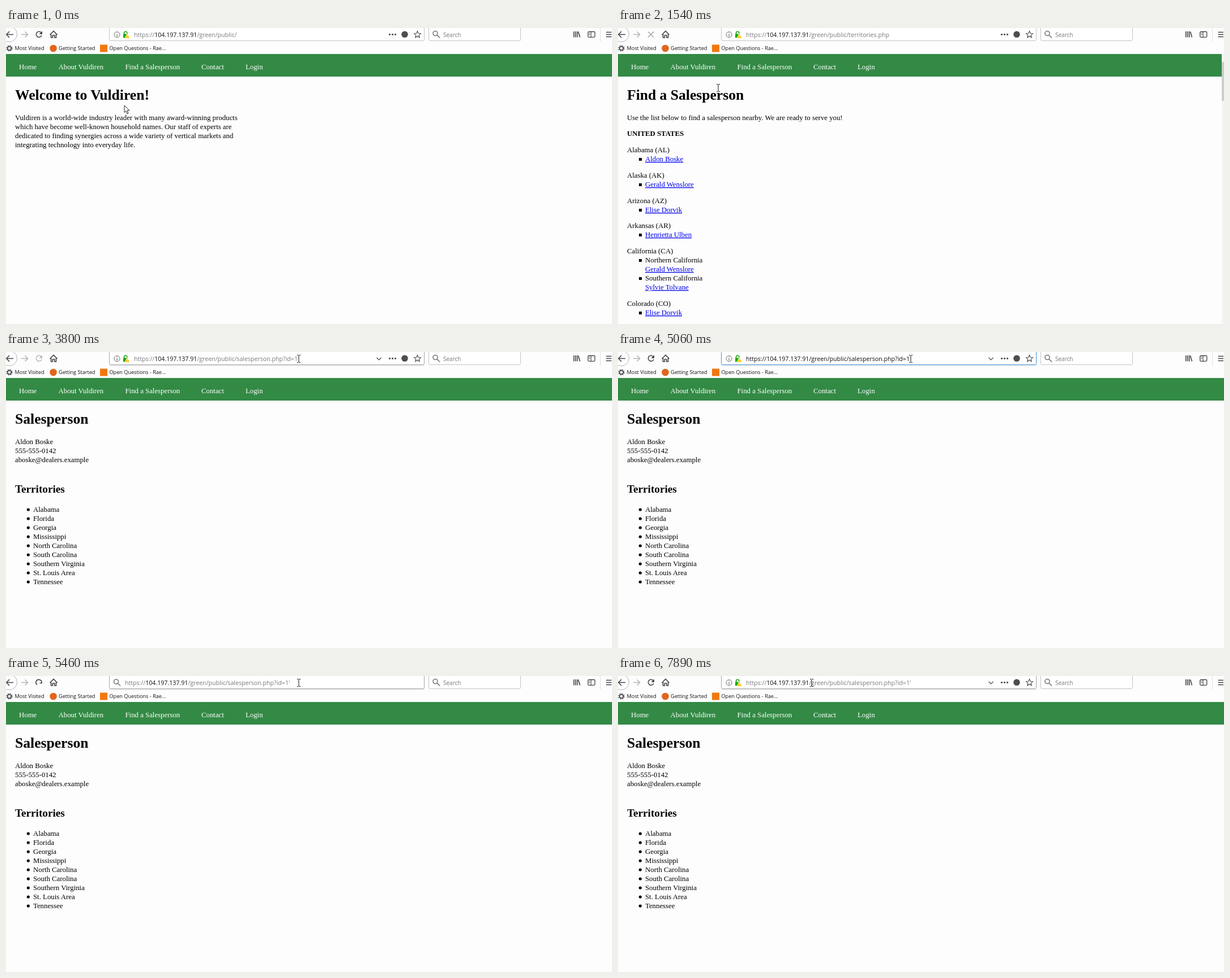
An HTML page for the animation above (8000 ms loop, 1070 px wide and 524 px high).

```html
<!DOCTYPE html>
<html lang="en">
<head>
<meta charset="utf-8">
<title>Browsing a sales site</title>
<style>
  html, body { margin: 0; width: 100%; height: 100%; overflow: hidden; background: #fdfdfd; }
  svg { display: block; width: 1070px; height: 524px; }
  .page { font: 12.8px "Liberation Serif", "Times New Roman", serif; }
  .ui { font: 9.15px "Open Sans", "Noto Sans", sans-serif; }
  .address { font-size: 10.62px; }
  h1, .h1 { font-size: 25.6px; font-weight: bold; }
  .h2 { font-size: 19.2px; font-weight: bold; }
  .line { fill: none; stroke: #45454a; stroke-width: 1.6; }
  .link { fill: #00e; text-decoration: underline; }
</style>
</head>
<body>
<svg viewBox="0 0 1070 524" xmlns="http://www.w3.org/2000/svg">
  <rect width="1070" height="524" fill="#fdfdfd"/>

  <g class="page">
    <rect id="nav" y="46" height="40" fill="#338a45"/>
    <g fill="#fff">
      <text x="23" y="73">Home</text>
      <text x="92.5" y="73">About Vuldiren</text>
      <text x="210.5" y="73">Find a Salesperson</text>
      <text x="345" y="73">Contact</text>
      <text x="423" y="73">Login</text>
    </g>
    <g data-when="home" id="home"><text class="h1" x="16" y="127">Welcome to Vuldiren!</text></g>
    <g data-when="list" id="list">
      <text class="h1" x="16" y="127">Find a Salesperson</text>
      <text x="16" y="163">Use the list below to find a salesperson nearby. We are ready to serve you!</text>
      <text x="16" y="191" font-weight="bold">UNITED STATES</text>
      <rect x="1066" y="46" width="4" height="478" fill="#f4f4f4"/>
      <rect x="1066" y="60" width="4" height="69" fill="#cdcdcd"/>
    </g>
    <g data-when="person" id="person">
      <text class="h1" x="16" y="127">Salesperson</text>
      <text class="h2" x="16" y="249">Territories</text>
    </g>
  </g>

  <g class="ui" id="toolbar">
    <!-- back, forward, reload, home -->
    <circle cx="6" cy="11" r="13.5" fill="#fff" stroke="#b4b4b6"/>
    <path class="line" d="M13 11.5H1M6 6L.8 11.5L6 17"/>
    <path class="line" style="stroke:#b6b6b8" d="M27 11.5H38.5M33.5 6.5L38.5 11.5L33.5 16.5"/>
    <g data-when="reload off">
      <path id="reloadArc" class="line" d="M62.3 8.2A5 5 0 1 0 63 13"/>
      <path id="reloadTip" d="M64 5.5V11H58.5Z" fill="#45454a"/>
    </g>
    <path data-when="spin" class="line" d="M55 15.5A5 5 0 1 1 62.8 12.5M59.5 12.5H64"/>
    <path data-when="slash" class="line" style="stroke:#77777b" d="M53 7L60 14"/>
    <path data-when="stop" class="line" style="stroke:#a9a9ac" d="M53 6.5L63 16.5M63 6.5L53 16.5"/>
    <path class="line" d="M77.5 12L84 5.5L90.5 12M79.5 11V17H82.3V13H85.7V17H88.5V11"/>

    <!-- address bar -->
    <path id="barShadow" d="M182.5 24H738.5" stroke="#d5d5d7"/>
    <rect id="bar" x="182.5" y="-4.5" width="556" height="27" rx="2" fill="#fff"/>
    <g data-when="typing sent">
      <circle class="line" style="stroke:#77777b" cx="194.5" cy="10" r="4"/>
      <path class="line" style="stroke:#77777b" d="M197.5 13L202 17.5"/>
    </g>
    <g data-when="idle hover focus select">
      <circle cx="196" cy="11.7" r="5" fill="none" stroke="#6b6b6f"/>
      <path d="M196 11V15M196 8.4V9.7" stroke="#6b6b6f" stroke-width="1.2"/>
      <path d="M208.5 11V9A2.7 2.7 0 0 1 214 9V11" fill="none" stroke="#12a812" stroke-width="1.6"/>
      <rect x="207" y="10.5" width="8" height="7" rx="1" fill="#12a812"/>
      <path d="M214 9.5L218.5 18H209.5Z" fill="#ffbf00" stroke="#fff" stroke-width=".6"/>
      <path d="M214 12.3V15M214 16V17" stroke="#fff"/>
      <g class="line">
        <path d="M676 11.5h3m2 0h3m2 0h3" stroke-width="2.6"/>
        <path d="M726.5 5.5L728.2 9.5L732.4 9.8L729.2 12.6L730.2 16.8L726.5 14.5L722.8 16.8L723.8 12.6L720.6 9.8L724.8 9.5Z" stroke-width="1.1"/>
      </g>
      <circle cx="704" cy="11.3" r="5.8" fill="#4d4d52"/>
    </g>
    <path data-when="chevron" class="line" style="stroke-width:1.2" d="M654.5 10L658.5 14L662.5 10"/>
    <rect data-when="select" x="226" y="4" width="288" height="15" fill="#0078d7"/>
    <text id="url" class="address" y="16"><tspan>https://</tspan><tspan>104.197.137.91</tspan><tspan></tspan></text>

    <!-- search box and right-hand buttons -->
    <rect x="746.5" y="-4.5" width="162" height="27" rx="2" fill="#fff" stroke="#c3c3c5"/>
    <g class="line" style="stroke:#77777b">
      <circle cx="758" cy="9.5" r="4"/>
      <path d="M761 12.5L766 17.5"/>
    </g>
    <text x="772" y="16" font-size="10" fill="#77777b">Search</text>
    <g class="line">
      <path d="M1002.7 6V16.5M1005.7 6V16.5M1008.7 6V16.5M1010.5 6.5L1013.5 16.5"/>
      <rect x="1027.7" y="6.5" width="12" height="9.8" rx="1.5" stroke-width="1.3"/>
      <path d="M1033 6.5V16M1029.5 9H1031.5M1029.5 11.5H1031.5" stroke-width="1.1"/>
      <path d="M1059.5 7.5H1069M1059.5 11.5H1069M1059.5 15.5H1069" stroke-width="1.4"/>
    </g>
    <path d="M1049.5 0V24" stroke="#dedee0"/>

    <!-- bookmarks -->
    <circle cx="6" cy="36" r="3.2" class="line"/>
    <circle cx="6" cy="36" r="4.8" class="line" style="stroke-dasharray:1.9 1.87"/>
    <circle cx="83.5" cy="36" r="6.3" fill="#e0661c"/>
    <rect x="166" y="29.5" width="13" height="13" fill="#f0780f"/>
    <g fill="#111">
      <text x="15.5" y="39">Most Visited</text>
      <text x="93" y="39">Getting Started</text>
      <text x="182.5" y="39">Open Questions - Rae...</text>
    </g>
    <g data-when="typing" id="menu" class="address">
      <rect y="24" width="1070" height="301" fill="#fff"/>
      <path d="M0 324.5H1070" stroke="#c3c3c5"/>
      <rect y="28" width="1070" height="26" fill="#0a84ff"/>
    </g>
  </g>

  <g id="cursor" stroke="#111" stroke-linejoin="round">
    <path data-when="arrow" fill="#fff" stroke-width=".9" d="M0 0V12.5L2.9 9.8L5 15L7 14.1L4.9 9.1H9Z"/>
    <path data-when="ibeam" fill="none" d="M-3 -6.5H-1L0 -5.5L1 -6.5H3M0 -5.5V5.5M-3 6.5H-1L0 5.5L1 6.5H3"/>
    <path data-when="hand" fill="#fff" d="M-1.5 1Q0 -1 1.5 1V6Q3.5 5 4.5 7Q6.5 6 7 8Q9 7.5 9 9.5V13L7 17H-1.5L-5.5 11Q-5 8.5 -1.5 11Z"/>
  </g>
</svg>
<script>
const $ = id => document.getElementById(id);
const LOOP = 8000;

function add(parent, tag, attrs, content = '') {
  const el = document.createElementNS('http://www.w3.org/2000/svg', tag);
  for (const key in attrs) el.setAttribute(key, attrs[key]);
  el.textContent = content;
  return $(parent).appendChild(el);
}
function lines(parent, x, y, step, items, attrs = {}) {
  items.forEach((s, i) => add(parent, 'text', { x, y: y + i * step, ...attrs }, s));
}

lines('home', 16, 163, 16, [
  'Vuldiren is a world-wide industry leader with many award-winning products',
  'which have become well-known household names. Our staff of experts are',
  'dedicated to finding synergies across a wide variety of vertical markets and',
  'integrating technology into everyday life.'
]);

// Each entry: state, then its regions and salespeople; "*" marks a link.
let y = 220;
[
  ['Alabama (AL)', '*Aldon Boske'],
  ['Alaska (AK)', '*Gerald Wenslore'],
  ['Arizona (AZ)', '*Elise Dorvik'],
  ['Arkansas (AR)', '*Henrietta Ulben'],
  ['California (CA)', 'Northern California', '*Gerald Wenslore', 'Southern California', '*Sylvie Tolvane'],
  ['Colorado (CO)', '*Elise Dorvik']
].forEach(([state, ...rows]) => {
  const top = Math.round(y);
  add('list', 'text', { x: 16, y: top }, state);
  rows.forEach((row, i) => {
    const base = top + 16 * (i + 1), link = row[0] === '*';
    add('list', 'text', { x: 48, y: base, class: link ? 'link' : '' }, row.replace('*', ''));
    if (!link || rows.length === 1) add('list', 'rect', { x: 37, y: base - 6, width: 5, height: 5 });
  });
  y += 28.8 + 16 * rows.length;
});

lines('person', 16, 163, 16, ['Aldon Boske', '555-555-0142', 'aboske@dealers.example']);
const areas = ['Alabama', 'Florida', 'Georgia', 'Mississippi', 'North Carolina', 'South Carolina',
  'Southern Virginia', 'St. Louis Area', 'Tennessee'];
lines('person', 48, 283, 16, areas);
areas.forEach((_, i) => add('person', 'circle', { cx: 39.3, cy: 279 + 16 * i, r: 2.6 }));

const root = '/green/public/', detail = root + 'salesperson.php?id=1';
const paths = { home: root, list: root + 'territories.php', person: detail };
[detail + "'", detail, paths.list, root].forEach((path, i) =>
  add('menu', 'text', { x: 210, y: 45 + 26 * i, fill: i ? '#333' : '#fff' }, 'https://104.197.137.91' + path));

// Timelines hold each value until the next time.
const pages = [[0, 'home'], [1240, 'list'], [3290, 'person']];
const reloads = [[0, 'reload'],
  [1090, 'spin'], [1240, 'slash'], [1390, 'stop'], [1680, 'off'], [2200, 'reload'],
  [3020, 'spin'], [3140, 'slash'], [3290, 'stop'], [3440, 'off'], [3950, 'reload'],
  [5460, 'spin'], [5580, 'slash'], [5720, 'stop'], [6160, 'off'], [6760, 'reload']];
const bars = [[0, 'idle'], [3440, 'hover'], [3950, 'focus'], [4100, 'select'], [4660, 'focus'],
  [5310, 'typing'], [5460, 'sent'], [5720, 'hover'], [6160, 'idle'], [7200, 'hover']];
const chevrons = [[0, ''], [3440, 'chevron'], [5310, ''], [5720, 'chevron'], [6160, ''], [7350, 'chevron']];
const moves = [
  [0, 'arrow', 209, 137], [150, 'arrow', 209, 132], [310, 'ibeam', 210, 122], [460, 'ibeam', 211, 111],
  [620, 'arrow', 213, 98], [780, 'arrow', 215, 82], [930, 'hand', 217, 70], [1240, 'arrow', 212, 80],
  [1390, 'arrow', 196, 92], [1540, 'ibeam', 177, 106], [1680, 'ibeam', 150, 128], [1810, 'ibeam', 122, 155],
  [1940, 'ibeam', 98, 183], [2070, 'ibeam', 82, 206], [2200, 'ibeam', 77, 217], [2320, 'ibeam', 77, 218],
  [2590, 'hand', 74, 230], [3020, 'arrow', 180, 165], [3140, 'arrow', 295, 86], [3290, 'arrow', 400, 50],
  [3440, 'ibeam', 490, 16], [3560, 'ibeam', 512, 12], [3680, 'ibeam', 517, 12],
  [6160, 'arrow', 512, 30], [6310, 'arrow', 500, 62], [6460, 'arrow', 488, 91], [6610, 'arrow', 478, 88],
  [6760, 'arrow', 462, 70], [6900, 'arrow', 440, 48], [7050, 'arrow', 420, 28], [7200, 'ibeam', 400, 14],
  [7350, 'ibeam', 385, 13], [7490, 'ibeam', 368, 12], [7620, 'ibeam', 354, 12], [7760, 'ibeam', 346, 12],
  [7890, 'ibeam', 342, 12]];
const at = (track, t) => track.findLast(step => step[0] <= t);

const conditional = [...document.querySelectorAll('[data-when]')];
const urlParts = [...$('url').children];

function draw(t) {
  const page = at(pages, t)[1], reload = at(reloads, t)[1], bar = at(bars, t)[1];
  const [, pointer, x, y] = at(moves, t);
  const on = [page, reload, bar, at(chevrons, t)[1], pointer];
  for (const el of conditional)
    el.style.display = el.dataset.when.split(' ').some(w => on.includes(w)) ? '' : 'none';

  const focused = ['focus', 'select', 'typing'].includes(bar);
  const icon = reload === 'off' ? '#b9b9bb' : '#45454a';
  $('reloadArc').style.stroke = icon;
  $('reloadTip').style.fill = icon;
  $('bar').setAttribute('stroke', focused ? '#4292dc' : bar === 'idle' ? '#c3c3c5' : '#a4a4a7');
  $('barShadow').style.display = bar === 'idle' ? 'none' : '';
  $('nav').setAttribute('width', page === 'list' ? 1066 : 1070);

  $('url').setAttribute('x', bar === 'typing' || bar === 'sent' ? 210 : 226);
  urlParts[2].textContent = paths[page] + (t >= 5310 ? "'" : '');
  urlParts.forEach((part, i) =>
    part.setAttribute('fill', bar === 'select' ? '#fff' : focused || i === 1 ? '#111' : '#7a7a7e'));
  $('cursor').setAttribute('transform', `translate(${x} ${y})`);
}

function tick() {
  draw(performance.now() % LOOP);
  requestAnimationFrame(tick);
}
tick();
</script>
</body>
</html>
```
